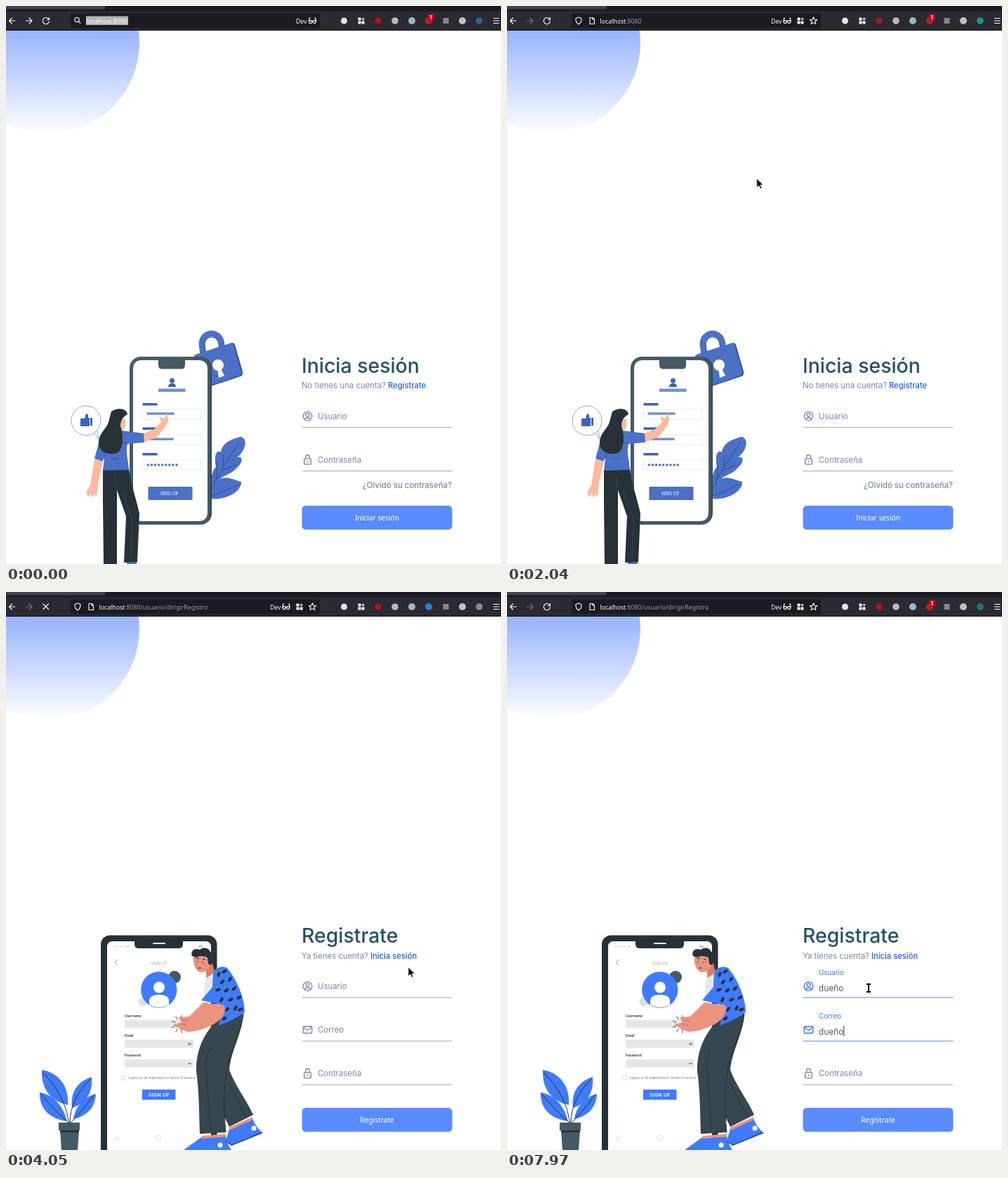
An HTML page for the animation above (8000 ms loop, 705x794 px).

```html
<!DOCTYPE html>
<html lang="es">
<head>
<meta charset="utf-8">
<style>
html, body { margin: 0; overflow: hidden; background: #fff; }
svg { display: block; width: 705px; height: 794px; }
text { font-family: Inter, sans-serif; font-size: 11.4px; white-space: pre; }
.ui { font-family: "Noto Sans", sans-serif; font-size: 8.7px; fill: #fbfbfe; }
.ui tspan { fill: #9a99a3; }
.title { font-size: 28.4px; font-weight: 500; fill: #235067; }
.soft { fill: #7b86a8; }
.link { font-size: 11.2px; font-weight: 500; fill: #1c62cf; }
.button { font: 10.2px "Noto Sans", sans-serif; fill: #fff; text-anchor: middle; }
.value { font: 11.7px "Noto Sans", sans-serif; fill: #555; }
.tiny { font-size: 5px; fill: #777; }
.tag { font-size: 4.8px; font-weight: 600; fill: #263238; }
.line { fill: none; stroke: #fbfbfe; stroke-width: 1.1; stroke-linecap: round; stroke-linejoin: round; }
.blue { fill: #4b70c6; }
.pale { fill: #7190d4; }
.deep { fill: #3d63b3; }
.skin { fill: #ffb99d; }
.dark { fill: #263238; }
.bright { fill: #407bff; }
.box { fill: #fff; stroke: #e9e9ed; stroke-width: .8; }
</style>
</head>
<body>
<svg viewBox="0 0 705 794">
<defs>
  <linearGradient id="sky" gradientUnits="userSpaceOnUse" x1="0" y1="35" x2="0" y2="182">
    <stop stop-color="#98b3ff"/><stop offset="1" stop-color="#fff"/>
  </linearGradient>
  <g id="user" fill="none" stroke="currentColor" stroke-width="1.3">
    <circle r="6.3"/><circle cy="-1.5" r="2.4"/><path d="M-4 4.7C-3 1.5 3 1.5 4 4.7"/>
  </g>
  <g id="lock" fill="none" stroke="currentColor" stroke-width="1.4">
    <rect x="-4.8" y="-1.6" width="9.6" height="8" rx="1"/><path d="M-2.8-1.6V-4.2a2.8 2.8 0 0 1 5.6 0v2.6M0 1v2.8"/>
  </g>
  <g id="mail" fill="none" stroke="currentColor" stroke-width="1.4">
    <rect x="-6.2" y="-4.8" width="12.4" height="9.6" rx="1"/><path d="M-6-3.6L0 .7L6-3.6"/>
  </g>
  <g id="glasses" class="line">
    <circle cx="-2.8" cy="2" r="2.1"/><circle cx="2.8" cy="2" r="2.1"/>
    <path d="M-5 1.500L-4.500-3.500H-3.200M5 1.500L4.500-3.500H3.200M-1 1.500h2"/>
  </g>
  <path id="tiles" fill="#fbfbfe" d="M-4.5-4.5h4v4h-4zM-4.5.5h4v4h-4zM.5.5h4v4h-4zM2-4.5h1.2v1.4h1.4v1.2H3.2V-.5H2v-1.4H.6v-1.2H2z"/>
</defs>
<rect width="705" height="794" fill="#fff"/>
<circle cx="60" cy="52" r="130" fill="url(#sky)"/>

<g id="login">
  <path d="M279 503V482a14 15 0 0 1 28-2V492" transform="rotate(-8 293 482)" fill="none" stroke="#4b70c6" stroke-width="8.5"/>
  <path d="M283 497V483a10 11 0 0 1 20-2V492" transform="rotate(-8 293 482)" fill="none" stroke="#2f4d91" stroke-width="1"/>
  <path d="M270 496L321 479.500Q325 478.500 326 482L337 520Q338 525 334 527L292 541L270 535Z" fill="#35549c"/>
  <path d="M268 497L319 480Q323 479 324 483L335 520Q336 524 332 526L288 541L270 535Z" class="blue"/>
  <path d="M301 515L305 514L311 526L303 529Z" fill="#fff"/><circle cx="302" cy="511" r="8" fill="#fff"/>
  <g class="blue">
    <path d="M290 701C291 680 292 661 299 656C296 641 299 630 306 635C308 620 324 616 334 613C347 616 339 636 329 642C338 640 338 649 329 657C320 667 311 667 305 673C315 668 326 675 335 677C336 690 315 704 290 701Z"/>
    <path d="M290 693C303 663 319 641 333 620M299 675L301 649M309 655L310 638M307 661L327 653M290 697C307 694 319 685 331 681" fill="none" stroke="#2f4d91"/>
  </g>
  <rect x="178" y="499" width="115" height="239" rx="16" fill="#37474f"/>
  <rect x="176" y="499" width="115" height="239" rx="16" fill="#455a64"/>
  <path d="M193 504H217V511Q217 516.500 222 516.500H250Q255 516.500 255 511V504H274Q287 504 287 517V720Q287 733 274 733H193Q181 733 181 720V517Q181 504 193 504Z" fill="#fff"/>
  <circle cx="236.500" cy="533" r="3.500" class="deep"/><path d="M231 542C231 535 242 535 242 542Z" class="deep"/>
  <path d="M217 544.500h38.500v4.500h-38.500z" class="pale"/>
  <path d="M194.500 565h21v3.500h-21zm0 34.500h21v3.500h-21zm0 36.500h21v3.500h-21z" class="deep"/>
  <path d="M194.500 574h83.500v14h-83.500zm0 36h83.500v14h-83.500zm0 36h83.500v14h-83.500z" class="box"/>
  <path d="M200.500 578.300h39v3.500h-39zm0 36.200h38v3.500h-38z" class="pale"/>
  <path d="M202.300 653h42" stroke="#4b70c6" stroke-width="3.600" stroke-linecap="round" stroke-dasharray="0 5.100"/>
  <rect x="202.500" y="684" width="63" height="19" rx="1" class="blue"/>
  <text x="232.500" y="695.800" text-anchor="middle" style="font:6.300px 'Noto Serif',serif" fill="#fff">SING UP</text>

  <path d="M126 608L132 616L130 604" fill="#fff" stroke="#7190d4" stroke-width=".8"/>
  <circle cx="114" cy="590" r="21" fill="#fff" stroke="#7190d4" stroke-width=".8"/>
  <path d="M106 587H112L114 580Q118 580 117 586H119V598H106ZM120 586H123V597H120Z" class="deep"/>

  <path d="M126 645L138 648L131 679L130 688L129 699L126 694L123 700L121 693L117 699L114 692L120 682Z" class="skin"/>
  <path d="M196 608L211 602L221 592L218 584L225 587L230 579L231 591Q226 602 214 614L196 621Z" class="skin"/>
  <path d="M139 791H158V794H139ZM172 789H186V794H172Z" class="blue"/>
  <path d="M138 660L175 659C178 681 186 703 190 722L187 791L168 792L171 726L158 689V794H139L138 705Z" class="dark"/>
  <path d="M158 689L155 670M165 690L180 730L178 790" fill="none" stroke="#3d4a51" stroke-width=".8"/>
  <path d="M133 618L163 604L196 608L197 621L173 623C170 635 174 645 175 660L138 661L140 643L137 648L126 644Z" class="blue"/>
  <path d="M165 620L173 623M140 643L145 627M150 644H160" fill="none" stroke="#2f4d91"/>
  <path d="M162 589L170 587L170 598L167 604L161 603Z" class="skin"/>
  <path d="M150 577C158 571 172 572 173 581C166 585 163 590 163 598C168 612 167 631 158 636C146 640 132 635 132 622C132 606 145 602 147 588Z" class="dark"/>

  <text x="421" y="521.500" class="title">Inicia sesión</text>
  <text x="421" y="544.200" class="soft">No tienes una cuenta?</text>
  <text x="544" y="544.200" class="link">Registrate</text>
  <text x="635" y="685.500" class="soft" text-anchor="end" font-weight="500">¿Olvidó su contraseña?</text>
  <rect x="421.500" y="711" width="214" height="34" rx="5.500" fill="#5a8cff"/>
  <text x="528.500" y="732.300" class="button">Iniciar sesión</text>
</g>

<g id="register">
  <rect x="135" y="488.500" width="165.500" height="330" rx="13" class="dark"/>
  <path d="M152 497H183V501Q183 507 189 507H246Q252 507 252 501V497H284Q292 497 292 505V794H144V505Q144 497 152 497Z" fill="#fff"/>
  <path d="M210 500H226" stroke="#fff" stroke-width="1.800" stroke-linecap="round"/>
  <path d="M154 504.500h15" stroke="#bbb" stroke-width="1.600" stroke-linecap="round" stroke-dasharray="0 3.300"/>
  <path d="M171 503.500h5l-2.500 3zM274 502.500h6v3.500h-6z" fill="#ccc"/>
  <path d="M159 523L155 527L159 531" fill="none" stroke="#999"/>
  <text x="218" y="531" text-anchor="middle" class="tiny" style="font-size:5.800px;fill:#aaa">SIGN UP</text>
  <circle cx="240" cy="548" r="9" fill="#455a64"/><circle cx="195" cy="583" r="6.500" fill="#dde2e0"/>
  <circle cx="217.800" cy="566" r="25.700" class="bright"/>
  <g fill="#fff"><circle cx="218" cy="562.500" r="8"/><path d="M204 587V581Q205 573 218 573Q231 573 232 581V587Q218 595 204 587Z"/></g>
  <text x="169" y="605" class="tag">Username</text>
  <text x="169" y="633" class="tag">Email</text>
  <text x="169" y="661" class="tag">Password</text>
  <path d="M169 609h98v11.500h-98zm0 28h98v11.500h-98zm0 28.300h98v11.500h-98z" fill="#e6e6e6"/>
  <path d="M259 641.500h5v3h-5zm0 28.500h5v2h-5z" fill="#999"/>
  <rect x="164" y="688.500" width="5.500" height="5.500" fill="#fff" stroke="#ddd"/>
  <text x="174" y="693" class="tiny" style="font-size:4.700px">I agree to all statements in terms of service</text>
  <rect x="194" y="708" width="47.500" height="14.500" class="bright"/>
  <text x="218" y="717.800" text-anchor="middle" style="font-size:6.800px;font-weight:600;letter-spacing:.3px" fill="#fff">SIGN UP</text>
  <g fill="none" stroke="#e2e2e5"><path d="M155 777L158.500 774L162 777M156.500 777V780H160.500V777M269 775h6m-6 4h6"/><circle cx="217.500" cy="777" r="4"/></g>
  <path id="sparks" fill="none" stroke="#455a64"/>

  <g class="bright">
    <path d="M313 781L318 764L351 748Q354 760 366 770L321 788Z"/>
    <path d="M253 794L278 776L313 773Q314 784 321 794Z"/>
  </g>
  <path d="M318 764L351 749M278 776L313 773" stroke="#eb937e" stroke-width="4"/>
  <path d="M313 782L322 787L365 769" fill="none" stroke="#263238"/>
  <g fill="#fff"><circle cx="353" cy="763" r="3.500"/><circle cx="305" cy="787" r="3.500"/></g>
  <path d="M304 610L338 598C337 628 321 650 318 680C326 702 344 725 352 744L318 761C304 732 290 705 291 690Z" fill="#37474f"/>
  <path d="M303 607C284 625 270 650 271 682C275 710 275 740 276 771L313 769C309 735 310 711 314 684C319 657 336 624 338 598Z" fill="#37474f"/>
  <path d="M338 600C336 628 318 650 314 684C310 704 310 735 313 769M290 650Q282 665 286 690L291 765M317 698L342 746" fill="none" stroke="#263238"/>
  <path d="M284 545L297 539L300 571L281 583Z" fill="#e6eaed"/>
  <path d="M295 539Q307 530 315 535C330 553 340 579 340 598Q327 608 303 617L309 588L278 581L294 562Z" class="bright"/>
  <path d="M281 584L311 588C314 599 307 609 296 615Q277 625 259 626L250 623L238 615L250 613L246 605L261 604Z" fill="#eb937e"/>
  <path d="M247 614L258 617M250 609L261 611" stroke="#b96859" stroke-width=".8"/>
  <path d="M283 532L294 528L297 541L286 549Z" fill="#d97f6c"/>
  <path d="M267 516C266 529 269 538 276 541C286 542 293 535 293 523L289 513Z" fill="#eb937e"/>
  <path d="M265 518C262 511 269 506 276 509C280 505 289 506 290 511C295 514 297 523 292 531L288 529L287 520Q277 516 271 520Z" class="dark"/>
  <path d="M271 522l4-1m5 1l4 1M272 525.500v1.500m8-1v1.500M273 535l5 0" fill="none" stroke="#263238" stroke-width="1.100"/>
  <g id="spots" class="dark"></g>

  <g class="bright">
    <path d="M51 680C72 683 90 700 88 730C62 724 50 706 51 680Z"/>
    <path d="M122 690C124 712 114 728 94 734C91 712 102 696 122 690Z"/>
    <path d="M48 712C67 715 81 730 87 753C62 750 47 735 48 712Z"/>
    <path d="M128 714C127 736 113 746 96 750C98 732 112 718 128 714Z"/>
  </g>
  <path d="M90 756Q84 715 53 684M91 756Q91 722 120 693M90 756Q72 741 50 715M91 756Q105 743 125 716" fill="none" stroke="#263238"/>
  <path d="M75 755H105V766H75Z" fill="#455a64"/><path d="M77 766H104L102 794H79Z" fill="#455a64"/><path d="M77 766H104L103 769H77Z" class="dark"/>

  <text x="421" y="498.500" class="title">Registrate</text>
  <text x="421" y="521.500" class="soft">Ya tienes cuenta?</text>
  <text x="519" y="521.500" class="link">Inicia sesión</text>
  <rect x="421.500" y="734" width="214" height="34" rx="5.500" fill="#5a8cff"/>
  <text x="528.500" y="755.300" class="button">Registrate</text>
</g>

<rect width="705" height="8" fill="#1c1b22"/>
<rect x="-4" y="-3" width="145.500" height="7.500" rx="2" fill="#42414d"/>
<rect y="7.500" width="705" height="26.500" fill="#2b2a33"/>
<rect y="34" width="705" height="1" fill="#0c0c0d"/>
<path d="M13 21H4.500M8.500 17L4.500 21L8.500 25" class="line"/>
<path id="forward" d="M28.500 21H37M33 17L37 21L33 25" class="line"/>
<path id="reload" d="M60.500 18.200A4.600 4.600 0 1 0 61.500 21.500M61.500 16.500V19.500H58.500" class="line"/>
<path id="stop" class="line"/>
<rect id="bar" rx="2.500" fill="#1c1b22"/>
<g id="searching">
  <g class="line"><circle cx="101" cy="19.500" r="3.200"/><path d="M103.500 22L106 24.500"/></g>
  <rect id="selection" x="114" y="14.500" width="60" height="12.500" fill="#b5b5b8"/>
  <text x="413" y="24.500" class="ui">Dev</text><use href="#glasses" x="436.500" y="20.500"/>
</g>
<g id="visiting">
  <path d="M102 16L106 17.500Q106.500 23 102 26Q97.500 23 98 17.500ZM118 16.500H122L124.500 19V25.500H118ZM122 16.500V19H124.500" class="line"/>
  <text x="376" y="24.500" class="ui">Dev</text><use href="#glasses" x="399" y="20.500"/>
  <use href="#tiles" x="418" y="21"/>
  <path d="M436.500 15.800L438 19.300L441.700 19.600L438.900 22L439.800 25.600L436.500 23.600L433.200 25.600L434.100 22L431.300 19.600L435 19.300Z" class="line"/>
</g>
<text id="address" class="ui" y="24.500"></text>
<circle cx="481.500" cy="21" r="4.500" fill="#e4e4e8"/>
<use href="#tiles" x="506" y="21"/>
<circle cx="530" cy="21" r="4.500" fill="#b3131b"/>
<circle cx="554" cy="21" r="4.800" fill="#b9b9b9"/>
<circle cx="578" cy="21" r="5" fill="#9db6c3"/>
<circle id="blocker" cx="602" cy="21" r="5"/>
<g id="badge"><rect x="601" y="11.500" width="8.500" height="8.500" rx="1" fill="#d70022"/><text x="605.200" y="18.500" text-anchor="middle" style="font-size:7.500px;font-weight:700" fill="#fff">1</text></g>
<rect x="622.500" y="17" width="8" height="8" fill="#85858a"/>
<circle cx="650" cy="21" r="5" fill="#c4bfbd"/>
<circle id="guard" cx="674" cy="21" r="4.800"/>
<path d="M694.500 17.500H702M694.500 21H702M694.500 24.500H702" class="line"/>

<path id="arrow" d="M0 0V12.500L3 10L5 14.500L7 13.500L5 9.200L9 9Z" fill="#111" stroke="#fff" stroke-width=".5"/>
<path id="beam" d="M-3-5.500H3M-3 5.500H3M0-5.500V5.500" fill="none"/>
</svg>

<script>
const $ = id => document.getElementById(id);
const show = (el, on) => el.style.display = on ? '' : 'none';
const within = (t, ...spans) => spans.some(([a, b]) => t >= a && t < b);
const ease = x => 1 - (1 - Math.min(1, Math.max(0, x))) ** 2;
const LOOP = 8000, NAME = 'dueño', SWAP = 3980;

function field(page, y, label, icon) {
  $(page).insertAdjacentHTML('beforeend', `<g transform="translate(0 ${y})">
    <use href="#${icon}" x="429.5"/><path d="M421.5 16H635.5" stroke-width="1"/>
    <text x="444">${label}</text><text x="444" y="6.5" class="value"></text>
    <path d="M0-6V9" stroke="#333" stroke-width="1"/></g>`);
  const [mark, rule, name, value, caret] = $(page).lastElementChild.children;
  return (focus, typed = '', caretOn = false) => {
    const active = focus > 0.3;
    mark.style.color = active ? '#4274e6' : '#7b86a8';
    rule.setAttribute('stroke', active ? '#5b83e8' : '#a0a4b5');
    name.setAttribute('fill', active ? '#4274e6' : '#7b86a8');
    name.setAttribute('y', 4 - 20 * focus);
    name.style.fontSize = 11.4 - 1.6 * focus + 'px';
    value.textContent = typed;
    show(caret, caretOn);
    caret.setAttribute('transform', `translate(${444.5 + (typed ? value.getComputedTextLength() : 0)} 0)`);
  };
}
const loginUser = field('login', 583.7, 'Usuario', 'user');
field('login', 645.7, 'Contraseña', 'lock')(0);
const newUser = field('register', 561, 'Usuario', 'user');
const newMail = field('register', 623, 'Correo', 'mail');
field('register', 685.2, 'Contraseña', 'lock')(0);

const spots = [[303, 544], [311, 540], [308, 555], [319, 551], [302, 566], [314, 567], [325, 564],
  [307, 580], [320, 580], [332, 577], [315, 594], [327, 592], [334, 594], [311, 607]];
$('spots').innerHTML = spots.map(([x, y], i) =>
  `<ellipse cx="${x}" cy="${y}" rx="2.1" ry="3.9" transform="rotate(${20 + i * 37 % 50} ${x} ${y})"/>`).join('');
$('sparks').setAttribute('d', Array.from({ length: 9 }, (_, i) => {
  const a = i * Math.PI * 2 / 9, c = Math.cos(a), s = Math.sin(a);
  return `M${248 + 7 * c} ${615 + 7 * s}L${248 + 13 * c} ${615 + 13 * s}`;
}).join(''));

// time, x, y
const path = [[70, 520, 728], [820, 245, 85], [960, 229.5, 20], [1500, 229.5, 20], [1920, 330, 190],
  [2430, 511, 581], [2900, 511, 581], [3280, 573, 534], [4320, 573, 534], [4600, 580, 540],
  [4800, 580, 540], [5130, 515, 563.5], [LOOP, 515, 563.5]];
function pointer(t) {
  const i = path.findIndex(p => p[0] > t), [t0, x0, y0] = path[i - 1] || path[0], [t1, x1, y1] = path[i];
  const k = Math.max(0, (t - t0) / (t1 - t0)), s = k * k * (3 - 2 * k);
  return [x0 + (x1 - x0) * s, y0 + (y1 - y0) * s];
}

const typedAt = (t, start, step) => NAME.slice(0, Math.max(0, Math.floor((t - start) / step) + 1));

function drawBrowser(t) {
  const visiting = t >= 1640, leaving = t >= 3420, focused = within(t, [480, 960]);
  show($('searching'), !visiting);
  show($('visiting'), visiting);
  show($('selection'), t < 960);
  const grow = focused ? 3.5 : 0, bar = $('bar');
  bar.setAttribute('x', 92 - grow);
  bar.setAttribute('y', 10.5 - grow * .7);
  bar.setAttribute('width', 355 + grow * 2);
  bar.setAttribute('height', 21 + grow * 1.4);
  bar.setAttribute('stroke', focused ? '#00ddff' : 'none');
  $('address').setAttribute('x', visiting ? 132.5 : 114);
  const rest = ':8080' + (leaving ? '/usuario/dirigirRegistro' : '');
  $('address').innerHTML = t < 960 ? 'localhost' + rest : `localhost<tspan>${rest}</tspan>`;
  $('forward').setAttribute('opacity', visiting ? .35 : 1);

  const started = leaving ? 3420 : 1220, loading = within(t, [1220, 2000], [3420, 4390]);
  show($('reload'), !loading);
  show($('stop'), loading);
  $('stop').setAttribute('d', t - started < 140 ? 'M53.500 17.500L59.500 24' : 'M53 17L60.500 24.500M60.500 17L53 24.500');

  const pending = within(t, [1640, 1970], [3490, 4320]);
  show($('badge'), !pending);
  $('blocker').setAttribute('fill', pending ? '#1687d9' : '#c21a1a');
  $('guard').setAttribute('fill', pending ? '#8b8b8b' : t < 1640 ? '#2b6690' : t < 3490 ? '#129b80' : '#1c7683');
}

function drawPointer(t) {
  const [x, y] = pointer(t), inBar = within(t, [930, 1560]);
  const text = inBar || within(t, [2400, 2950], [5060, LOOP]);
  show($('arrow'), !text && t >= 70);
  show($('beam'), text);
  $('arrow').setAttribute('transform', `translate(${x} ${y})`);
  $('beam').setAttribute('transform', `translate(${x} ${y}) scale(${inBar ? .85 : 1})`);
  $('beam').setAttribute('stroke', inBar ? '#eee' : '#000');
  $('beam').setAttribute('stroke-width', inBar ? 1 : 2);
}

function draw(t) {
  show($('login'), t < SWAP);
  show($('register'), t >= SWAP);
  drawBrowser(t);
  loginUser(ease((t - 2650) / 300) - ease((t - 3290) / 300), '', within(t, [2650, 3180]));
  newUser(ease((t - 5230) / 320), typedAt(t, 6230, 132), within(t, [5230, 5770], [6230, 6890]));
  newMail(ease((t - 6900) / 300), typedAt(t, 7100, 68), within(t, [6960, 7440], [7970, LOOP]));
  drawPointer(t);
}

const begin = performance.now();
function tick() {
  draw((performance.now() - begin) % LOOP);
  requestAnimationFrame(tick);
}
tick();
</script>
</body>
</html>
```
